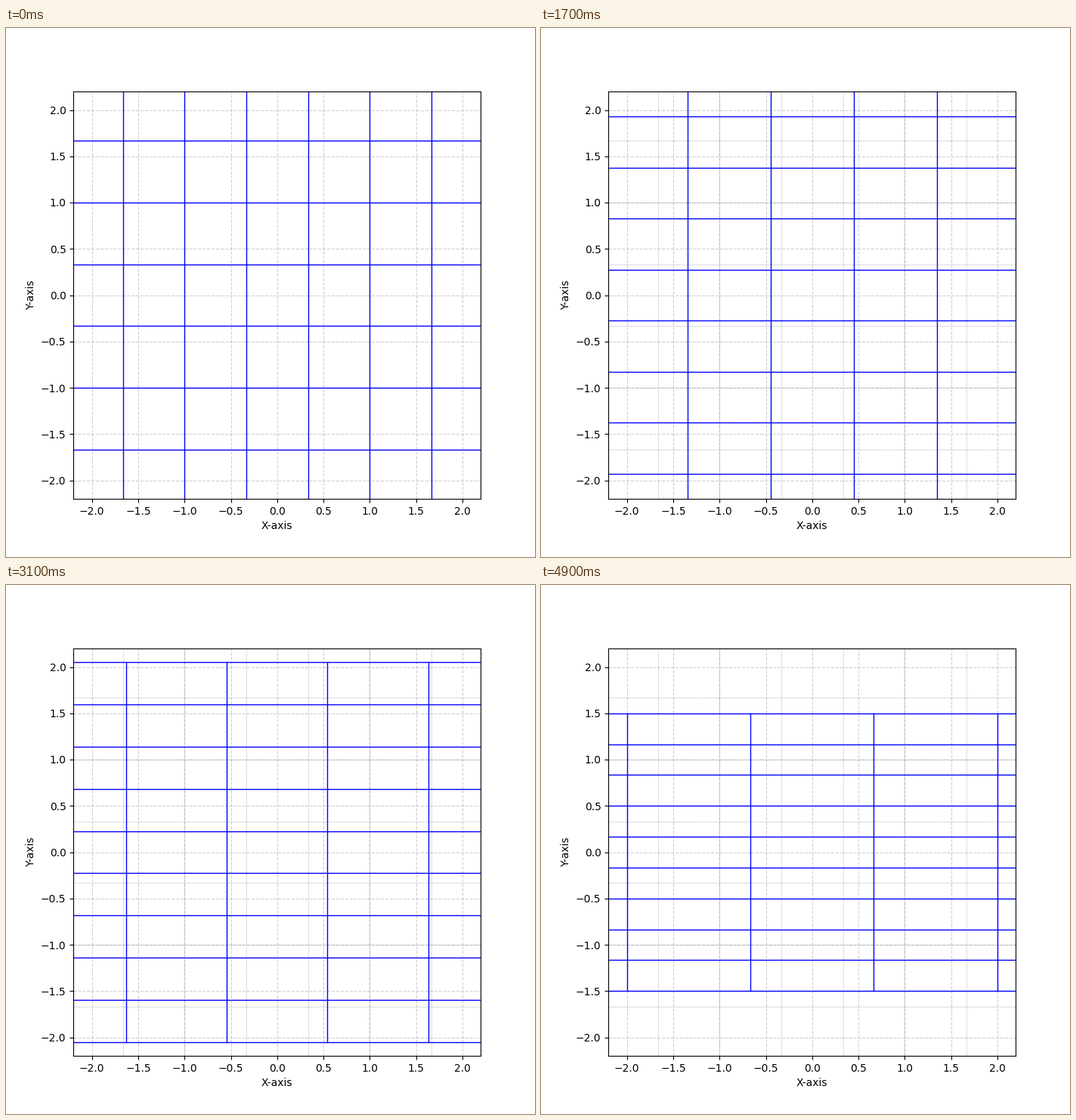
Write a matplotlib script that moves like this. It is 700 by 700 pixels and loops after 5 s.

```python
import numpy as np
import matplotlib.pyplot as plt
from matplotlib.animation import FuncAnimation

FRAMES = 50
INTERVAL = 100
EXTENT = 3
LIMIT = 2.2
END_SCALE = np.array([2.0, 0.5])

positions = np.linspace(-EXTENT, EXTENT, 10)
span = np.array([-EXTENT, EXTENT])
segments = [(np.full(2, p), span) for p in positions]
segments += [(span, np.full(2, p)) for p in positions]

fig, ax = plt.subplots(figsize=(7, 7), dpi=100)
ax.set_xlim(-LIMIT, LIMIT)
ax.set_ylim(-LIMIT, LIMIT)
ax.set_aspect("equal")
ax.set_xlabel("X-axis")
ax.set_ylabel("Y-axis")
ax.grid(True, linestyle="--", alpha=0.6)


def draw_mesh(**style):
    return [ax.plot(x, y, **style)[0] for x, y in segments]


draw_mesh(color="gray", linestyle=":", linewidth=0.5)
mesh = draw_mesh(color="blue", linewidth=1)


def update(frame):
    """Scale the mesh linearly from the identity to END_SCALE."""
    t = frame / (FRAMES - 1)
    sx, sy = 1 + t * (END_SCALE - 1)
    for line, (x, y) in zip(mesh, segments):
        line.set_data(sx * x, sy * y)
    return mesh


anim = FuncAnimation(fig, update, frames=FRAMES, interval=INTERVAL,
                     repeat=True, repeat_delay=0)
plt.show()
```
